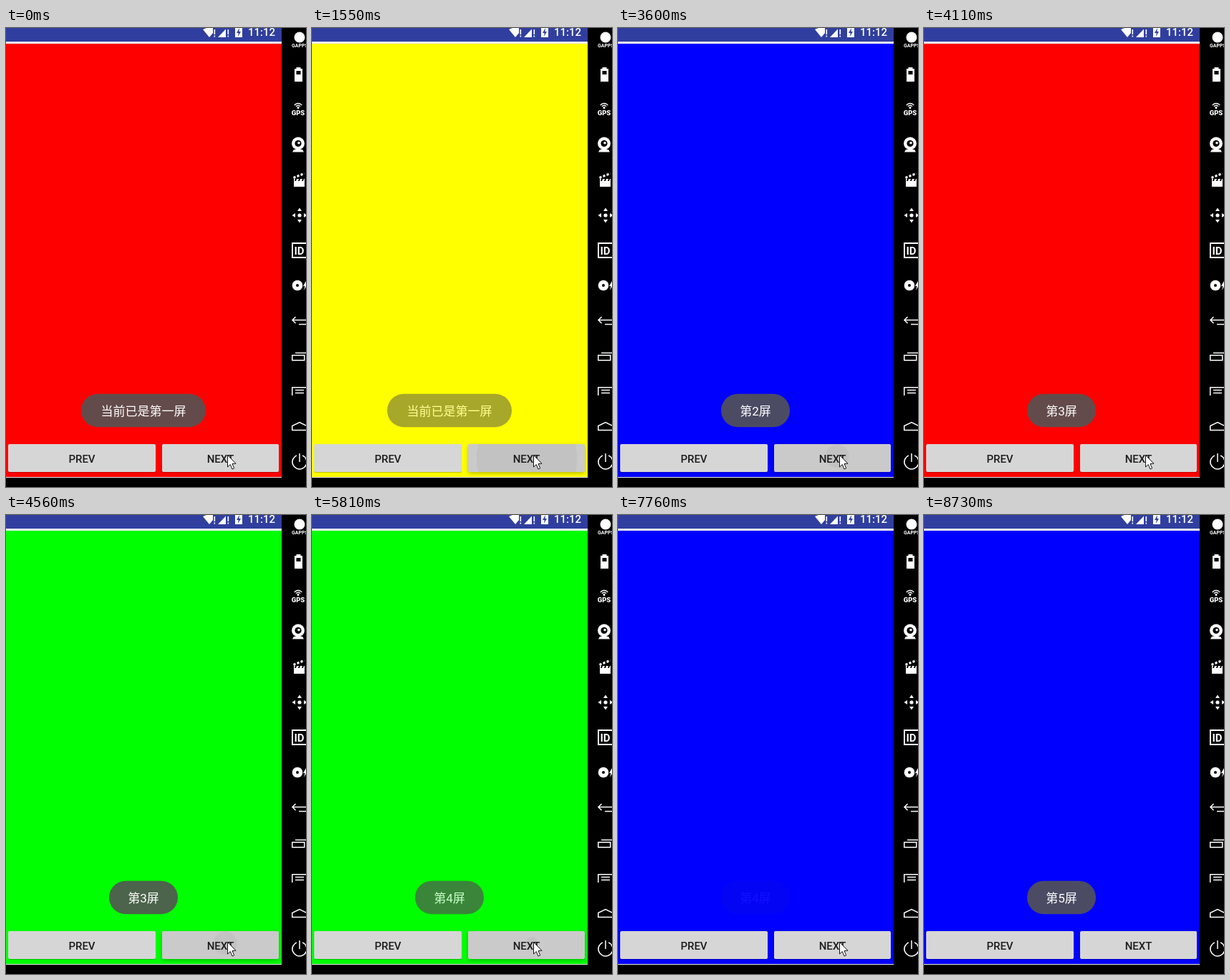
Write an HTML page with a canvas that moves like this. It is 419x642 px and loops after 9310 ms.

```html
<!DOCTYPE html>
<html lang="zh-CN">
<head>
<meta charset="utf-8">
<title>Screens</title>
<style>
html, body { margin: 0; width: 100%; height: 100%; overflow: hidden; background: #000; }
canvas { display: block; }
</style>
</head>
<body>
<canvas id="stage" width="419" height="642"></canvas>
<script>
const stage = document.getElementById('stage');
const layer = document.createElement('canvas');
layer.width = stage.width;
layer.height = stage.height;
const screenCtx = stage.getContext('2d');
const layerCtx = layer.getContext('2d');
let ctx = screenCtx;

const LOOP = 9310;
const STEP = 120;
const TAU = Math.PI * 2;
const FONT = 'Roboto, "Noto Sans CJK SC", "Noto Sans CJK", sans-serif';
const FIRST = '当前已是第一屏';
const COLORS = ['#f00', '#0f0', '#ff0', '#00f'];

// Bursts of page turns, one turn per STEP.
const bursts = [
  { start: 1550, turns: 2 }, { start: 2210, turns: 3 }, { start: 3600, turns: 2 },
  { start: 4560, turns: 1 }, { start: 5960, turns: 2 }
];
const presses = [
  { down: 1375, up: 1600, fade: 300 }, { down: 2060, up: 2450, fade: 150 },
  { down: 3560, up: 3660, fade: 60 }, { down: 4520, up: 4650, fade: 60 },
  { down: 5790, up: 6230, fade: 820 }
];
const toasts = [
  { show: -500, hide: 1720 }, { show: 1750, hide: 5600 },
  { show: 5615, hide: 7780 }, { show: 8000, hide: LOOP + 500 }
];

const clamp = v => Math.max(0, Math.min(1, v));

function pageColor(t) {
  let n = 0;
  for (const b of bursts) {
    n += Math.max(0, Math.min(b.turns, Math.floor((t - b.start) / STEP) + 1));
  }
  // the first turn skips a screen
  return COLORS[(n + (n > 0)) % COLORS.length];
}

function pressState(t) {
  const p = presses.find(p => t >= p.down && t < p.up + p.fade);
  if (!p) return { glow: 0, radius: 0 };
  return {
    glow: clamp((t - p.down) / 20) * clamp(1 - (t - p.up) / p.fade),
    radius: t < p.up ? (t - p.down) * 0.4 : 0
  };
}

function toastState(t) {
  const w = toasts.find(w => t >= w.show && t < w.hide);
  if (!w) return null;
  const number = 2 + Math.floor((t - 1700) / 2040);
  return {
    label: w === toasts[0] ? FIRST : `第${number}屏`,
    alpha: Math.min(clamp((t - w.show) / 250), clamp((w.hide - t) / 300))
  };
}

function rect(x, y, w, h, color) {
  ctx.fillStyle = color;
  ctx.fillRect(x, y, w, h);
}

function disc(x, y, r, color) {
  ctx.fillStyle = color;
  ctx.beginPath();
  ctx.arc(x, y, r, 0, TAU);
  ctx.fill();
}

function trace(points) {
  ctx.beginPath();
  for (let i = 0; i < points.length; i += 2) ctx.lineTo(points[i], points[i + 1]);
}

function poly(color, ...points) {
  trace(points);
  ctx.closePath();
  ctx.fillStyle = color;
  ctx.fill();
}

function stroke(width) {
  ctx.strokeStyle = '#fff';
  ctx.lineWidth = width;
  ctx.stroke();
}

function line(...points) {
  trace(points);
  stroke(1.5);
}

function arc(x, y, r, from, to, width) {
  ctx.beginPath();
  ctx.arc(x, y, r, from, to);
  stroke(width);
}

function text(str, x, y, font, color) {
  ctx.font = `${font} ${FONT}`;
  ctx.fillStyle = color;
  ctx.textAlign = 'center';
  ctx.fillText(str, x, y);
}

function bang(x) {
  rect(x, 2, 1.6, 7, '#fff');
  rect(x, 10.5, 1.6, 2, '#fff');
}

function statusBar() {
  rect(0, 0, 385, 19, '#303f9f');
  rect(0, 19, 385, 3, '#eee');
  poly('#fff', 275, 2, 280, 0, 289, 0, 289, 7, 284, 13);
  bang(290.5);
  poly('#fff', 296, 13, 307, 1.5, 307, 13);
  bang(309.5);
  rect(320, 0, 10, 13, '#fff');
  poly('#303f9f', 326, 0, 322, 7, 324.7, 7, 324, 12, 328, 5, 325.5, 5);
  text('11:12', 357, 11, '500 15px', '#fff');
}

function clapper() {
  rect(402, 211, 15, 11, '#fff');
  poly('#fff', 401, 208, 416, 202, 417, 205, 402, 211);
  for (let x = 404; x < 415; x += 5) {
    const y = 206.5 - (x - 404) * 0.4;
    poly('#000', x, y, x + 2, y - 1, x + 3, y + 3, x + 1, y + 4);
    poly('#000', x, 211, x + 2, 211, x + 1, 214, x - 1, 214);
  }
}

function moveArrows() {
  disc(410, 262, 2.6, '#fff');
  for (let i = 0; i < 4; i++) {
    ctx.save();
    ctx.translate(410, 262);
    ctx.rotate(i * TAU / 4);
    poly('#fff', -3, -6, 3, -6, 0, -10.5);
    ctx.restore();
  }
}

function sidebar() {
  const w = '#fff', k = '#000';
  rect(385, 0, 34, 642, k);

  disc(410, 13, 7.5, w);
  text('GAPPS', 410.5, 27, 'bold 7px', w);

  // battery
  rect(405.5, 55, 6, 3, w);
  rect(403, 57, 11, 18, w);
  rect(405.5, 60, 6, 5, k);

  // GPS
  disc(408, 111.5, 1.5, w);
  for (const r of [3.7, 6.5]) arc(408, 112, r, -2.5, -0.64, 1.4);
  text('GPS', 408, 122, '900 9.5px', w);

  // webcam
  disc(408, 161.5, 9, w);
  disc(408, 161.5, 4.6, k);
  disc(409, 160.8, 1.8, w);
  poly(w, 402, 170, 414, 170, 416, 173.5, 400, 173.5);

  clapper();
  moveArrows();

  // ID
  ctx.beginPath();
  ctx.rect(400, 301, 22, 20);
  stroke(2);
  text('ID', 409.5, 316.5, 'bold 15px', w);

  // disc with bolt
  disc(407, 360, 7.3, w);
  disc(407, 360, 2, k);
  poly(w, 419, 354, 415, 361, 417.5, 361, 416, 367, 420, 360);

  // back
  line(419, 414.5, 409, 414.5);
  line(419, 408.5, 400, 408.5);
  line(404.5, 404, 400, 408.5, 404.5, 413);

  // recents
  line(399.75, 457.75, 416.75, 457.75, 416.75, 464.75, 399.75, 464.75, 399.75, 457);
  line(404, 454.5, 419, 454.5);

  // menu
  line(419, 502.75, 399.75, 502.75, 399.75, 514);
  for (const y of [506.5, 510.5]) line(404, y, 416, y);

  // home
  line(419, 562.5, 399.75, 562.5, 399.75, 556.5, 410, 551.5, 419, 556);

  // power
  arc(410, 607, 10, -1.15, 4.29, 1.6);
  line(410, 595, 410, 607);
}

function button(label, x, w, { glow, radius }) {
  const cx = x + w / 2;
  const shade = Math.round(214 - 12 * glow);
  ctx.save();
  ctx.shadowColor = 'rgba(0,0,0,.25)';
  ctx.shadowBlur = 1 + 4 * glow;
  ctx.shadowOffsetY = 1 + glow;
  ctx.beginPath();
  ctx.roundRect(x, 582, w, 39, 2);
  ctx.fillStyle = `rgb(${shade},${shade},${shade})`;
  ctx.fill();
  ctx.restore();
  if (radius) {
    // the ripple drifts to the button's centre as it grows
    const p = clamp(radius / 75);
    ctx.save();
    ctx.clip();
    disc(308 + (cx - 308) * p, 598 + 4 * p, radius, 'rgba(0,0,0,.04)');
    ctx.restore();
  }
  text(label, cx, 607.5, '500 15px', '#1c1c1c');
}

// Body and text fade together, so they are flattened on a layer first.
function toast(state) {
  if (!state) return;
  const w = state.label === FIRST ? 174 : 96;
  ctx = layerCtx;
  ctx.clearRect(0, 0, layer.width, layer.height);
  ctx.beginPath();
  ctx.roundRect(192 - w / 2, 511.7, w, 46.6, 23.3);
  ctx.fillStyle = 'rgba(84,84,84,.9)';
  ctx.fill();
  text(state.label, 192, 542, '17px', '#fff');
  ctx = screenCtx;
  ctx.globalAlpha = state.alpha;
  ctx.drawImage(layer, 0, 0);
  ctx.globalAlpha = 1;
}

function cursor(t) {
  const p = clamp((t - 8250) / 450) ** 2;
  ctx.save();
  ctx.translate(309 + 140 * p, 597 + 60 * p);
  poly('#fff', 0.5, 0.5, 0.5, 17, 4.3, 13.5, 7, 20, 9.7, 18.8, 7, 12.6, 12, 12.2);
  ctx.strokeStyle = '#111';
  ctx.lineWidth = 1;
  ctx.stroke();
  ctx.restore();
}

function draw(t) {
  rect(0, 0, 419, 642, '#000');
  rect(0, 22, 385, 606, pageColor(t));
  rect(0, 628, 385, 1, '#eee');
  statusBar();
  button('PREV', 3, 206, { glow: 0, radius: 0 });
  button('NEXT', 218, 163, pressState(t));
  toast(toastState(t));
  sidebar();
  cursor(t);
}

function tick() {
  draw(performance.now() % LOOP);
  requestAnimationFrame(tick);
}
tick();
</script>
</body>
</html>
```
